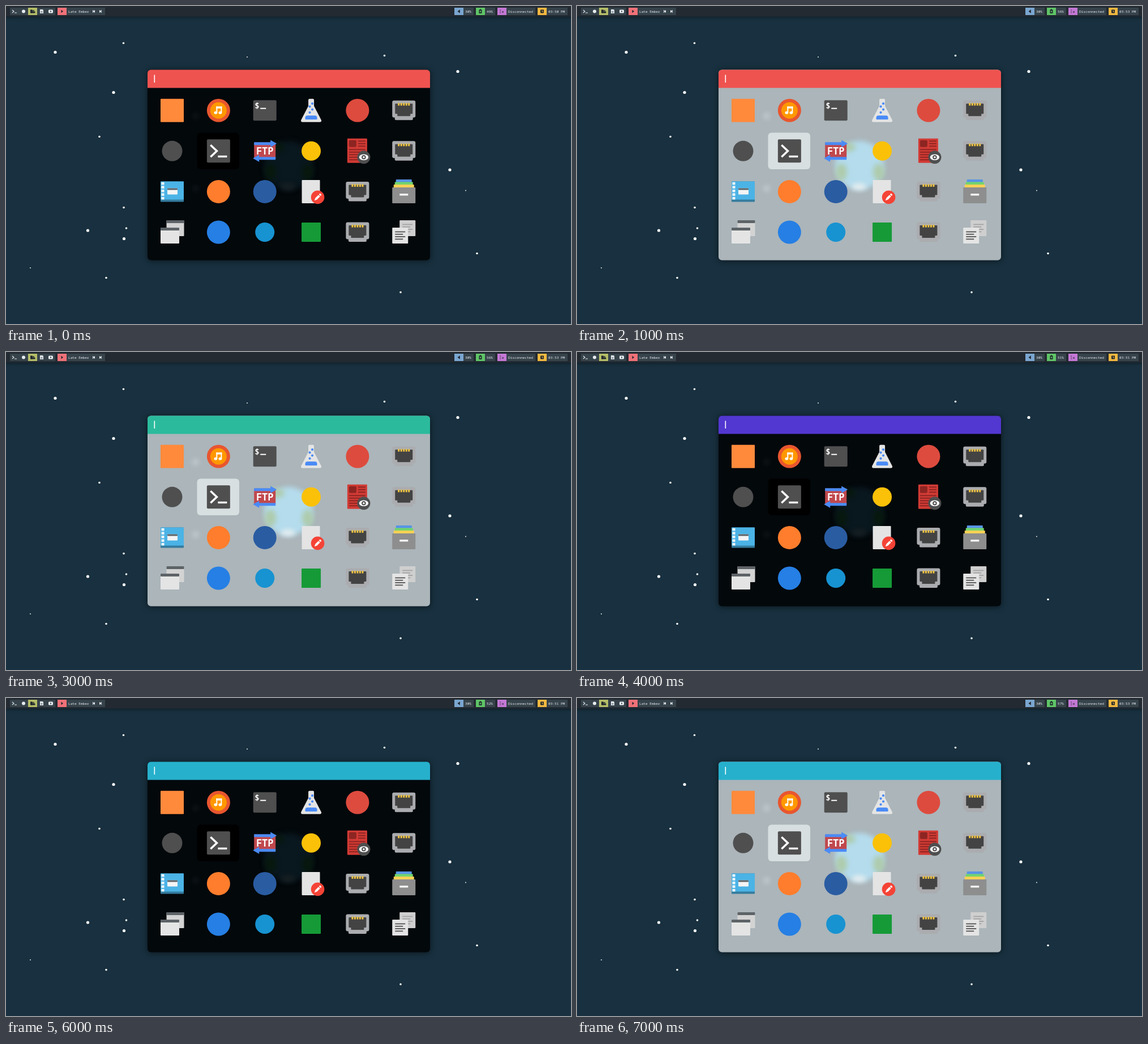
An HTML page with a canvas that plays this animation: 998 by 561 pixels, repeating every 8000 ms.

```html
<!DOCTYPE html>
<html lang="en">
<head>
<meta charset="utf-8">
<title>Launcher themes</title>
<style>
html, body { margin: 0; width: 100%; height: 100%; overflow: hidden; background: #18303f; }
canvas { display: block; }
</style>
</head>
<body>
<canvas id="stage" width="998" height="561"></canvas>
<script>
const ctx = document.getElementById("stage").getContext("2d");
const MONO = '"Noto Sans Mono", "DejaVu Sans Mono", monospace';
const STEP = 1000;
const GREY = "#4f4f4f", PAPER = "#e4e4e4", INK = "#20272d", PALE = "#e6ecef", CELL = "#37434b";
const RED = "#8d2522", BLUE = "#4a8bf6";

// Each accent shows a dark panel, then a light one
const ACCENTS = ["#ef5350", "#2bbb9c", "#5237d0", "#26b0cc"];
const LIGHT_CHARGE = [56, 56, 58, 57];

// Sorted from large to small
const STARS = [
  [87, 81.5], [798, 115.5], [208.5, 410.5], [190, 152.5], [784, 289], [144.5, 396],
  [207.5, 65.5], [668.5, 87.5], [165, 230.5], [208, 355.5], [212.5, 392],
  [832, 436.5], [177, 479.5], [697, 505],
  [426, 90], [812, 325.5], [43, 462]
];
const starSize = i => i < 6 ? 2.6 : i < 14 ? 1.8 : 0.9;

function repeat(n, draw) {
  for (let i = 0; i < n; i++) draw(i);
}

function at(x, y, draw, turn = 0) {
  ctx.save();
  ctx.translate(x, y);
  ctx.rotate(turn);
  draw();
  ctx.restore();
}

function box(x, y, w, h, color, r = 0) {
  ctx.fillStyle = color;
  ctx.beginPath();
  ctx.roundRect(x, y, w, h, r);
  ctx.fill();
}

function disc(x, y, r, color, ry = r) {
  ctx.fillStyle = color;
  ctx.beginPath();
  ctx.ellipse(x, y, r, ry, 0, 0, Math.PI * 2);
  ctx.fill();
}

function trace(points) {
  ctx.beginPath();
  points.forEach(([x, y], i) => i ? ctx.lineTo(x, y) : ctx.moveTo(x, y));
}

function line(points, color, width) {
  trace(points);
  ctx.strokeStyle = color;
  ctx.lineWidth = width;
  ctx.stroke();
}

// Triangle with its base at x, pointing along w
function wedge(x, y, w, half, color) {
  trace([[x, y - half], [x + w, y], [x, y + half]]);
  ctx.fillStyle = color;
  ctx.fill();
}

function chevron(x, y, w, half, width, color) {
  line([[x, y - half], [x + w, y], [x, y + half]], color, width);
}

function label(text, x, y, size, color = PALE, weight = "", align = "left") {
  ctx.font = `${weight} ${size}px ${MONO}`;
  ctx.textAlign = align;
  ctx.fillStyle = color;
  ctx.fillText(text, x, y);
}

// App icons, drawn around their own centre
const round = (color, r = 20.5) => () => disc(0, 0, r, color);
const square = (color, s) => () => box(-s / 2, -s / 2, s, s, color, 1);

function music() {
  disc(0, 0, 20.5, "#e8562f");
  disc(0, 0, 14.5, "#ff9800");
  box(-4, -7, 10, 3.5, "#fff");
  for (const x of [-4, 4]) {
    box(x, -7, 2, 11, "#fff");
    disc(x - 1, 4, 2.9, "#fff", 2.5);
  }
}

function dollar() {
  box(-20.5, -18, 41, 36, GREY, 2);
  label("$", -18, -3, 14, "#fff", "bold");
  box(-8, -4.5, 10, 2, "#fff");
}

function flask() {
  ctx.lineJoin = "round";
  trace([[0, -12], [15.5, 18], [-15.5, 18]]);
  ctx.closePath();
  ctx.fillStyle = ctx.strokeStyle = PAPER;
  ctx.lineWidth = 5;
  ctx.fill();
  ctx.stroke();
  box(-5, -20.5, 10, 22, PAPER, 2);
  box(-10.5, 9, 21, 7, BLUE, [4, 4, 1, 1]);
  repeat(4, i => disc(i % 2 ? -2.5 : 2, -12 + i * 5.2, 2.1, BLUE));
}

function port() {
  box(-20.5, -17.5, 41, 30, "#abacaf", 3);
  box(-16, 8, 32, 9, "#abacaf", 2);
  box(-15.5, -12, 31, 18, "#434343", 1);
  box(-11.5, 4, 23, 6, "#434343", 1);
  repeat(5, i => box(-10.5 + i * 4.5, -13, 3, 4.5, "#f0c443"));
}

function shell() {
  box(-20.5, -20.5, 41, 41, GREY, 2);
  chevron(-14, 0, 11, 10.5, 3.6, "#fff");
  box(-1, 8, 16, 3.4, "#fff");
}

function transfer() {
  box(-19, -15, 38, 29, "#c0484d", 1);
  for (const turn of [0, Math.PI]) at(0, 0, () => {
    box(-19, -15.5, 30, 5, BLUE);
    wedge(10, -13, 11, 6.2, BLUE);
  }, turn);
  label("FTP", 0, 6.2, 17, "#fff", "600", "center");
}

function viewer() {
  box(-18, -22, 35, 43, "#d23b35", 1);
  box(-15, -19, 13, 12, RED, 2);
  repeat(8, i => i < 3
    ? box(1, -18.5 + i * 4.5, 13, 2, RED)
    : box(-15, -17 + i * 4.5, i > 4 ? 18 : 29, 2, RED));
  disc(11, 11, 11.5, GREY);
  disc(11, 11, 8.2, "#fff", 5.3);
  disc(11, 11, 3.8, GREY);
  disc(11, 11, 1.8, "#fff");
}

function film() {
  box(-20.5, -18, 41, 36, "#357c9e", 1);
  box(-20.5, -18, 41, 32, "#4bb3e6", 1);
  repeat(5, i => box(-19, -16.5 + i * 6.5, 5, 4.5, "#f1f7fa"));
  frame(-8.5, -6, 18, 11, "#f4f4f4", 3);
}

function editor() {
  box(-16.5, -20.5, 32, 41, PAPER, 1);
  disc(11.5, 10, 11.8, "#f44336");
  at(11.5, 10, () => {
    box(-4, -2, 8, 4, "#fff");
    box(5, -2, 3, 4, "#fff", 1);
    wedge(-4, 0, -4, 2, "#fff");
  }, -Math.PI / 4);
}

function cabinet() {
  ["#5794e6", "#72d46d", "#f7d154"].forEach((color, i) =>
    box(-14 - i * 2, -21.5 + i * 4.5, 28 + i * 4, 6, color, 1));
  box(-20.5, -7.5, 41, 28, "#8e8e8e", 1);
  box(-7.5, 3.5, 15, 3.5, "#f2f2f2", 0.5);
}

function frame(x, y, w, h, body, head = 5) {
  box(x, y, w, h, body, 1);
  box(x, y, w, head, "#5d6367", 1);
}

function windows() {
  frame(-10, -21, 31, 28, "#d3d3d3");
  frame(-20.5, -8, 33, 28, PAPER);
}

function sheet(x, y, paper, ink) {
  box(x, y, 28, 28, paper, 1);
  repeat(4, i => box(x + 5, y + 6.5 + i * 4.3, i % 2 ? 14 : 18, 1.8, ink));
}

function pages() {
  sheet(-7.5, -21, "#cfcfcf", "#a2a2a2");
  sheet(-20.5, -8, PAPER, "#505050");
}

const ICONS = [
  square("#ff8a3c", 41), music, dollar, flask, round("#dd4b3e"), port,
  round(GREY, 18), shell, transfer, round("#fbc108", 17), viewer, port,
  film, round("#ff7d2c"), round("#2a5ca2"), editor, port, cabinet,
  windows, round("#267fe4"), round("#1793d1", 17), square("#159a37", 34), port, pages
];

// Status bar icons, also around their centre
function prompt() {
  chevron(-4, 0, 3, 2.5, 1.1, PALE);
  box(0, 2, 4, 1, PALE);
}

function folder() {
  box(-4, -3, 3.5, 6, INK);
  box(-4, -2, 7, 1.4, INK);
  box(-2.6, 0, 7, 3, INK, 0.5);
}

function note() {
  box(-3, -3.5, 6, 7, PALE, [0, 2, 0, 0]);
  repeat(2, i => box(-1.6, -0.3 + i * 1.7, 3.2, 0.8, CELL));
}

function video() {
  box(-4, -3, 8, 6, PALE, 1.5);
  wedge(-1, 0, 2.7, 1.6, CELL);
}

function skip(dir) {
  wedge(-2 * dir, 0, 3.5 * dir, 2.5, PALE);
  box(1.3 * dir - 0.5, -2.5, 1, 5, PALE);
}

function cellPack() {
  box(-2.5, -3, 5, 6.5, INK, 0.5);
  box(-1, -4, 2, 1.5, INK);
  box(-0.9, -1.3, 1.8, 3, "#5fc567");
}

function offline() {
  repeat(3, i => box(-3.5, -3 + i * 2.4, 1.2, 1.2, INK));
  for (const d of [-1.5, 1.5]) line([[1.5 - d, -0.5], [1.5 + d, 2.5]], INK, 1);
}

function dial() {
  box(-3, -3, 6, 6, INK, 1);
  line([[0, -2], [0, 0.5], [2, 0.5]], "#f0b840", 1);
}

function cell(x, icon, color = CELL) {
  box(x, 3, 16, 13, color);
  at(x + 8, 9.5, icon);
}

function info(x, w, color, icon, text) {
  box(x, 3, w, 13, CELL);
  cell(x, icon, color);
  label(text, x + 19, 12, 6.1);
}

function bar(battery, clock) {
  ctx.save();
  ctx.shadowColor = "rgba(0,0,0,.5)";
  ctx.shadowBlur = 7;
  box(-10, -10, 1018, 28.5, "#232a31");
  ctx.restore();

  [prompt, round(PALE, 3), folder, note, video].forEach((icon, i) =>
    cell(7 + i * 16, icon, i === 2 ? "#b5bd68" : CELL));

  info(91, 84, "#f07178", () => wedge(-1.5, 0, 3.5, 2.8, INK), "Late Ember");
  at(155, 9.5, () => skip(-1));
  at(167, 9.5, () => skip(1));

  info(792, 34, "#7aa6d0", () => wedge(1.8, 0, -4.3, 3.2, INK), "30%");
  info(830, 34, "#5fc567", cellPack, battery);
  info(868, 67, "#c478d5", offline, "Disconnected");
  info(939, 53, "#f0b840", dial, clock);
}

function sky() {
  ctx.fillStyle = "#18303f";
  ctx.fillRect(0, 0, 998, 561);
  STARS.forEach(([x, y], i) => disc(x, y, starSize(i), "#fff"));
}

function globe(light) {
  const land = light ? "#aecbac" : "#07180e";
  ctx.save();
  ctx.filter = "blur(4px)";
  disc(499, 281, 43, light ? "#b4dced" : "#09171e");
  for (const side of [-1, 1]) disc(500 + side * 33, 293, 10, land, 15);
  disc(477, 249, 15, land, 8);
  disc(498, 319, 13, light ? "#e6eef0" : "#172024", 6);
  ctx.globalAlpha = light ? 0.45 : 0.06;
  for (const y of [194, 322]) disc(335, y, 6, "#dce4e8");
  ctx.restore();
}

function panel(accent, light) {
  ctx.save();
  ctx.shadowColor = "rgba(0,0,0,.55)";
  ctx.shadowBlur = 11;
  ctx.shadowOffsetY = 1;
  box(250, 112.5, 499, 336, light ? "#abb5ba" : "#03080b", 6);
  ctx.restore();
  globe(light);
  box(250, 112.5, 499, 32, accent, [6, 6, 0, 0]);
  box(261.5, 121.5, 1.6, 13.5, "#fff");
  box(337.5, 223.5, 74.5, 64.5, light ? "#d8dfe0" : "#000", 6);
  ICONS.forEach((icon, i) =>
    at(293.5 + (i % 6) * 81.85, 184.2 + Math.floor(i / 6) * 71.6, icon));
}

function paint(step) {
  const theme = Math.floor(step / 2), light = step % 2 === 1;
  const charge = light ? LIGHT_CHARGE[theme] : 49 + theme;
  // The clock gains a minute for about every two percent
  const minute = light ? Math.floor(charge / 2) + 25 : 50 + Math.floor(theme / 2);
  sky();
  bar(`${charge}%`, `03:${light ? Math.max(53, minute) : minute} PM`);
  panel(ACCENTS[theme], light);
}

const start = performance.now();
let shown = -1;

function tick() {
  const step = Math.floor((performance.now() - start) / STEP) % (ACCENTS.length * 2);
  if (step !== shown) paint(shown = step);
  requestAnimationFrame(tick);
}
tick();
</script>
</body>
</html>
```
